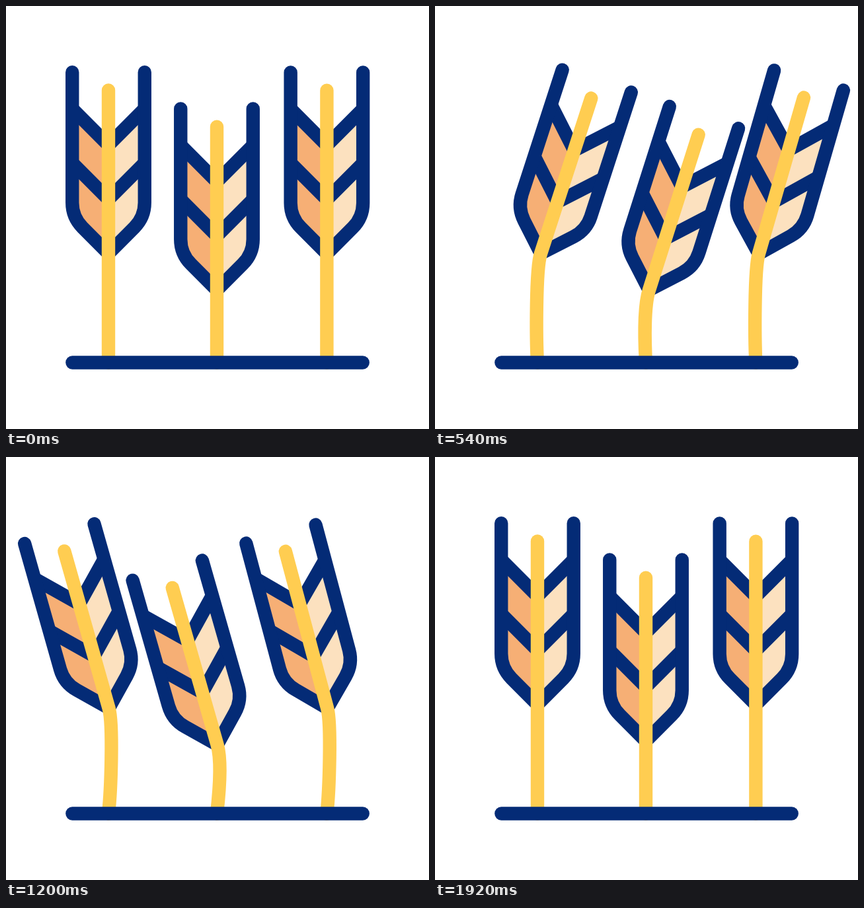
Recreate the animation shown at these times as an HTML page with a canvas. Size 640 by 640 pixels, loop 2.4 s.

```html
<!DOCTYPE html>
<html lang="en">
<head>
<meta charset="utf-8">
<title>Swaying wheat</title>
<style>
html, body { margin: 0; width: 100%; height: 100%; overflow: hidden; background: #fff; }
canvas { display: block; }
</style>
</head>
<body>
<canvas id="stage" width="640" height="640"></canvas>
<script>
const ctx = document.getElementById('stage').getContext('2d');
const NAVY = '#042b76', YELLOW = '#ffcd51', ORANGE = '#f6af75', CREAM = '#fce1bf';
const LOOP = 2400, GROUND = 539.5, HALF = 54.75;

// A pose: ear matrix around its bottom tip, tip offset, and lean of the stem's foot
const pose = (deg, x, y, lean) => {
  const a = deg * Math.PI / 180, c = Math.cos(a), s = Math.sin(a);
  return [c, s, -s, c, x, y, lean];
};
const REST = pose(0, 0, 374.5, 0);
const RIGHT = pose(18, 5, 374.5, -2);
const LEFT = pose(-16, 0.6, 380, 4);
const POSES = [REST, RIGHT, LEFT, REST];

const EARS = [
  { x: 155, y: 0, times: [0, 538, 1161, 1810] },
  { x: 319, y: 55.3, times: [60, 585, 1215, 1875] },
  { x: 485.4, y: 0.3, times: [95, 655, 1268, 1895] }
];

const ease = u => u * u * (3 - 2 * u);

// Points travel in straight lines between poses, so the matrices are blended directly
function poseAt(times, t) {
  if (t <= times[0] || t >= times[3]) return REST;
  const i = t < times[1] ? 0 : t < times[2] ? 1 : 2;
  const k = ease((t - times[i]) / (times[i + 1] - times[i]));
  return POSES[i].map((v, j) => v + (POSES[i + 1][j] - v) * k);
}

function drawEar(ear, t) {
  const [a, b, c, d, x, y, lean] = poseAt(ear.times, t);
  const ox = ear.x + x, oy = ear.y + y;

  // Build the path in ear space, paint in stage space to keep line widths constant
  const trace = build => {
    ctx.setTransform(a, b, c, d, ox, oy);
    ctx.beginPath();
    build();
    ctx.resetTransform();
  };
  const side = w => {
    ctx.lineTo(w, -77.5);
    ctx.arcTo(w, -55, 0, 0, 53);
    ctx.lineTo(0, 0);
  };

  for (const [sign, color] of [[-1, ORANGE], [1, CREAM]]) {
    trace(() => {
      ctx.moveTo(0, -164);
      ctx.lineTo(sign * HALF, -219);
      side(sign * HALF);
    });
    ctx.fillStyle = color;
    ctx.fill();
  }

  ctx.strokeStyle = NAVY;
  ctx.lineCap = 'butt';
  trace(() => {
    for (const top of [-219, -137]) {
      ctx.moveTo(-HALF, top);
      ctx.lineTo(0, top + 55);
      ctx.lineTo(HALF, top);
    }
  });
  ctx.stroke();

  ctx.lineCap = 'round';
  trace(() => {
    for (const w of [-HALF, HALF]) {
      ctx.moveTo(w, -274.3);
      side(w);
    }
  });
  ctx.stroke();

  trace(() => {
    ctx.moveTo(0, -247);
    ctx.lineTo(0, 0);
  });
  ctx.bezierCurveTo(ox + c * 25, oy + d * 25, ear.x + lean, 505, ear.x, GROUND);
  ctx.strokeStyle = YELLOW;
  ctx.stroke();
}

function draw(now) {
  const t = now % LOOP;
  ctx.fillStyle = '#fff';
  ctx.fillRect(0, 0, 640, 640);
  ctx.lineWidth = 20.4;
  for (const ear of EARS) drawEar(ear, t);
  ctx.beginPath();
  ctx.moveTo(100.4, GROUND);
  ctx.lineTo(539.7, GROUND);
  ctx.strokeStyle = NAVY;
  ctx.stroke();
  requestAnimationFrame(draw);
}
draw(0);
</script>
</body>
</html>
```
